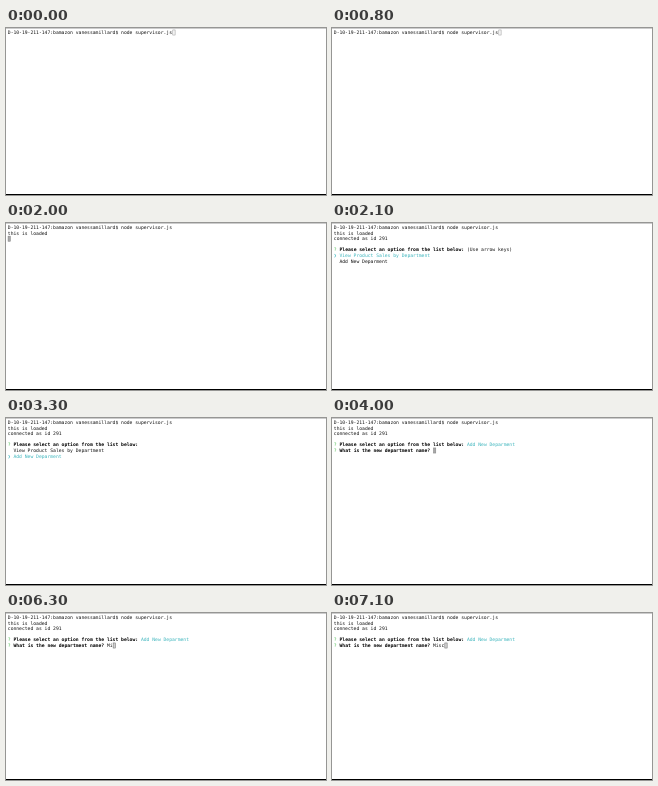
Animation, 320 px wide and 167 px high, one loop 8000 ms. Source, as an HTML page:

```html
<!DOCTYPE html>
<html lang="en">
<head>
<meta charset="utf-8">
<title>Terminal session</title>
<style>
  html, body { margin: 0; width: 100%; height: 100%; overflow: hidden; background: #fff; }
  svg { display: block; width: 100vw; height: 100vh; }
  text {
    font: 4.717px "DejaVu Sans Mono", "Liberation Mono", monospace;
    white-space: pre;
    text-rendering: geometricPrecision;
    fill: #111;
  }
  .bold { font-weight: bold; fill: #000; }
  .green { fill: #45b84a; }
  .cyan { fill: #3db5bd; }
  .cursor { fill: #a8a8a8; stroke: #808080; stroke-width: .5; }
  .cursor.idle { fill: #f4f4f4; stroke: #999; }
  .cursor.typing { fill: #d0d0d0; stroke: #666; }
</style>
</head>
<body>
<svg viewBox="0 0 320 167" preserveAspectRatio="none">
  <path d="M0 .5H320" stroke="#ccc"/>
  <path d="M0 166.5H320" stroke="#000"/>
  <g id="screen"></g>
</svg>
<script>
const LOOP = 8000, LEFT = 1.8, TOP = 1.7, CELL = 2.84, LINE = 5.6, ASCENT = 4.36;
const screen = document.getElementById('screen');

const span = (cls, s) => `<tspan class="${cls}">${s}</tspan>`;
const ask = s => span('green', '? ') + span('bold', s + ' ');

const command = 'D-10-19-211-147:bamazon vanessamillard$ node supervisor.js';
const loaded = [command, 'this is loaded'];
const connected = [...loaded, 'connected as id 291', ''];
const choose = ask('Please select an option from the list below:');
const choices = ['View Product Sales by Department', 'Add New Deparment'];
const question = 'What is the new department name?';

const menu = (picked, hint = '') => [
  ...connected, choose + hint,
  ...choices.map((c, i) => i === picked ? span('cyan', '❯ ' + c) : '  ' + c)
];
const answer = typed => [
  ...connected, choose + span('cyan', choices[1]), ask(question) + typed
];
const answerStep = (at, typed) =>
  [at, answer(typed), [question.length + 3 + typed.length, 5], typed ? 'typing' : ''];

// Each step: start time, lines, cursor cell [column, row], cursor style
const steps = [
  [0, [command], [command.length, 0], 'idle'],
  [1700, [command], [0, 1], ''],
  [2000, loaded, [0, 2], ''],
  [2100, menu(0, '(Use arrow keys)')],
  [3300, menu(1)],
  answerStep(4000, ''),
  answerStep(5800, 'M'),
  answerStep(6300, 'Mi'),
  answerStep(6600, 'Mis'),
  answerStep(7100, 'Misc')
];

function draw([, lines, cursor, style]) {
  let out = lines.map((s, row) =>
    `<text x="${LEFT}" y="${TOP + ASCENT + row * LINE}">${s}</text>`).join('');
  if (cursor) {
    const [col, row] = cursor;
    out += `<rect class="cursor ${style}" x="${LEFT + col * CELL + .25}" y="${TOP + row * LINE + .25}"
      width="${CELL - .5}" height="${LINE - .5}"/>`;
  }
  screen.innerHTML = out;
}

let shown;
function tick() {
  const t = performance.now() % LOOP;
  const step = steps.findLast(s => s[0] <= t);
  if (step !== shown) draw(shown = step);
  requestAnimationFrame(tick);
}
tick();
</script>
</body>
</html>
```
